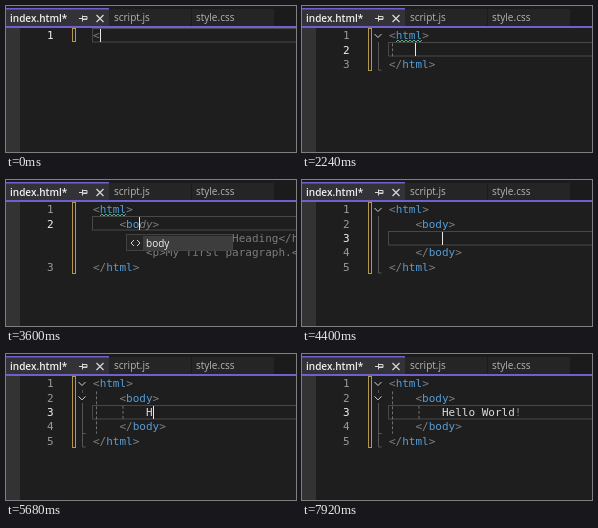
An HTML page for the animation above (8 s loop, 290 px wide and 146 px high).

```html
<!DOCTYPE html>
<html lang="en">
<head>
<meta charset="utf-8">
<title>Editor</title>
<style>
html, body { margin: 0; width: 100%; height: 100%; overflow: hidden; background: #1e1e1e; }
svg { display: block; width: 290px; height: 146px; }
text { white-space: pre; }
.ui { font: 10px "Open Sans", "Noto Sans", sans-serif; fill: #f0f0f0; }
.code { font: 11px "DejaVu Sans Mono", monospace; fill: #dcdcdc; }
.tag { fill: #569cd6; }
.mark { fill: #808080; }
.ghost { fill: #7c7c7c; }
.slant { font-style: italic; }
.num { fill: #9a9a9a; }
.now { fill: #f0f0f0; }
.line { fill: none; stroke: #8a8a8a; }
</style>
</head>
<body>
<svg viewBox="0 0 290 146">
  <rect width="290" height="146" fill="#1e1e1e"/>
  <rect y="22" width="14" height="124" fill="#333333"/>
  <rect width="290" height="21" fill="#1b1b1c"/>
  <rect x="103" y="3" width="82" height="17" fill="#252526"/>
  <rect x="186" y="3" width="82" height="17" fill="#252526"/>
  <rect y="2" width="103" height="19" fill="#333337"/>
  <rect y="2" width="103" height="1.5" fill="#6f60d0"/>
  <rect y="20" width="290" height="2" fill="#6f60d0"/>
  <text class="ui" x="4" y="16" font-weight="500" style="font-weight:600">index.html*</text>
  <text class="ui" x="108" y="15" style="fill:#b4b4b4">script.js</text>
  <text class="ui" x="190" y="15" style="fill:#b4b4b4">style.css</text>
  <path d="M73 12.5h3M76.5 9.5v6M77 10.5h4v3h-4M77 13h4" fill="none" stroke="#d8d8d8"/>
  <path d="M90.5 9l7 7m0-7l-7 7" fill="none" stroke="#d8d8d8" stroke-width="1.2"/>
  <g id="edit"></g>
</svg>
<script>
const LOOP = 8000, BLINK = 530, X0 = 87, CW = 6.62, TOP = 22, LH = 14.4;
const edit = document.getElementById('edit');
const colX = c => X0 + c * CW;
const rowY = r => TOP + r * LH;
const esc = s => s.replace(/&/g, '&amp;').replace(/</g, '&lt;');
const span = (cls, s) => s ? `<tspan class="${cls}">${esc(s)}</tspan>` : '';

// Colour brackets and tag names
const paint = s => s.split(/(<\/?\w*>?)/).map(p => {
  const m = /^(<\/?)(\w*)(>?)$/.exec(p);
  return m ? span('mark', m[1]) + span('tag', m[2]) + span('mark', m[3]) : esc(p);
}).join('');

// A row: [line number, indent, typed text, suggested text]
const steps = [];
const add = (t, rows, at, col, opts = {}) => steps.push({ t, rows, at, col, ...opts });

const typeRoot = (t, s, list) => add(t, [[1, 0, s, '']], 0, s.length, { list });
typeRoot(0, '<', false);
typeRoot(960, '<h', true);
typeRoot(1040, '<htm', true);
typeRoot(1120, '<html', true);
add(1280, [[1, 0, '<html></html>', '']], 0, 6);

const root = [1, 0, '<html>', ''];
const empty = [root, [2, 4, '', ''], [3, 0, '</html>', '']];
add(1760, empty, 1, 4, { wave: true });
add(2000, empty, 1, 4, { wave: true, fold: 1, guide: 1 });

const typeBody = (t, n) => {
  const s = '<body>';
  const hint = n > 1;
  const mid = hint
    ? [[0, 8, '', '<h1>My First Heading</h1>'], [0, 8, '', '<p>My first paragraph.</p>']] : [];
  add(t, [root, [2, 4, s.slice(0, n), hint ? s.slice(n) : ''], ...mid, [3, 0, '</html>', '']],
    1, 4 + n, { wave: true, tip: hint, slant: true });
};
[[3200, 1], [3360, 2], [3600, 3], [3760, 4], [3920, 5]].forEach(a => typeBody(...a));
add(4240, [root, [2, 4, '<body></body>', ''], [3, 0, '</html>', '']], 1, 10, { wave: true });

const typeHello = (t, n, hint, opts) => {
  const s = 'Hello World!';
  add(t, [root, [2, 4, '<body>', ''], [3, 8, s.slice(0, n), hint ? s.slice(n) : ''],
    [4, 4, '</body>', ''], [5, 0, '</html>', '']], 2, 8 + n, opts);
};
typeHello(4400, 0, false, { fold: 1 });
[[5200, 0], [5440, 1], [5760, 2], [6000, 2], [6240, 3], [6400, 4], [6640, 5], [6720, 6],
  [6880, 7], [6960, 8], [7040, 9], [7280, 10], [7360, 11]]
  .forEach(([t, n]) => typeHello(t, n, t >= 6000, { fold: 2, guide: 2 }));

const box = (x, y, w, h, fill, stroke = 'none') =>
  `<rect x="${x}" y="${y}" width="${w}" height="${h}" fill="${fill}" stroke="${stroke}"/>`;
const label = (x, y, s) => `<text class="ui" x="${x}" y="${y}">${s}</text>`;
const angles = (x, y) =>
  `<path d="M${x + 3} ${y - 3}l-3 3 3 3m3-6l3 3-3 3" fill="none" stroke="#d0d0d0"/>`;

function list() {
  const names = ['html', 'html4f', 'html4s', 'html4t', 'html5', 'xhtml10f', 'xhtml10s'];
  let s = box(92.5, 38.5, 145, 120, '#252526', '#424242') + box(109, 40, 116, 16, '#3d3d3d');
  names.forEach((name, i) => {
    const y = 48 + i * 16.6;
    s += label(113, y + 4, name);
    s += i ? `<rect x="98.5" y="${y - 4}" width="8" height="8" fill="none" stroke="#c4c4c4"/>` +
      `<path d="M101 ${y + 4}h3" stroke="#252526" stroke-width="1.5"/>` : angles(98, y);
  });
  return s + box(226, 39, 11, 107, '#2e2e2e') + box(228, 55, 7, 91, '#4d4d4d') +
    '<path d="M228 49.5l3.5-4.5 3.5 4.5z" fill="#999"/>';
}

const tip = () => box(120.5, 54.5, 106, 16, '#252526', '#424242') +
  box(137, 56, 89, 14, '#3d3d3d') + angles(125, 63) + label(140, 67, 'body');

function wave() {
  let d = 'M94 36';
  for (let i = 1; i <= 13; i++) d += `L${94 + i * 2} ${i % 2 ? 34 : 36}`;
  return `<path d="${d}" fill="none" stroke="#4ec98a" stroke-width=".9"/>`;
}

function folds(n, count) {
  const end = rowY(count) - 1;
  let s = `<path class="line" style="stroke:#555" d="M76.5 36V${end}h3"/>`;
  if (n > 1) s += box(72, 39, 9, 10, '#1e1e1e') + '<path class="line" style="stroke:#555" d="M77 79.5h3"/>';
  for (let i = 0; i < n; i++)
    s += `<path class="line" style="stroke:#d0d0d0" d="M72.5 ${rowY(i) + 6}l3.5 3.5 3.5-3.5"/>`;
  return s;
}

function guides(n, count) {
  let s = '';
  for (let i = 0; i < n; i++)
    s += `<path class="line" stroke-dasharray="3 2" style="stroke:#707070" d="M${90.5 + i * 26.5} ${
      rowY(i + 1) + 1}V${rowY(count - 1 - i)}"/>`;
  return s;
}

function draw(st, lit) {
  const n = st.rows.length, y = Math.round(rowY(st.at));
  let s = box(86.5, y + .5, 210, 13.5, 'none', '#484848');
  s += box(66.5, 22.5, 3, Math.round(n * LH) - 1, 'none', '#b5964a');
  if (st.fold) s += folds(st.fold, n);
  if (st.guide) s += guides(st.guide, n);
  st.rows.forEach(([num, indent, text, hint], i) => {
    const base = rowY(i) + 11.2;
    if (num) s += `<text class="code ${i === st.at ? 'now' : 'num'}" x="41" y="${base}">${num}</text>`;
    s += `<text class="code" x="${colX(indent)}" y="${base}">${paint(text)}${
      span(st.slant && num ? 'ghost slant' : 'ghost', hint)}</text>`;
  });
  if (st.wave) s += wave();
  if (st.list) s += list();
  if (st.tip) s += tip();
  if (lit) s += box(Math.round(colX(st.col)), y + 1, 1, 13, '#e8e8e8');
  edit.innerHTML = s;
}

let last = '';
function tick(now) {
  const t = now % LOOP;
  let i = steps.length - 1;
  while (steps[i].t > t) i--;
  const lit = (t - steps[i].t) % (2 * BLINK) < BLINK;
  const key = i + ':' + lit;
  if (key !== last) draw(steps[i], lit);
  last = key;
  requestAnimationFrame(tick);
}
const start = performance.now();
const run = () => { tick(Math.max(0, performance.now() - start)); };
draw(steps[0], true);
requestAnimationFrame(function loop(now) {
  const t = Math.max(0, now - start) % LOOP;
  let i = steps.length - 1;
  while (steps[i].t > t) i--;
  const lit = (t - steps[i].t) % (2 * BLINK) < BLINK;
  const key = i + ':' + lit;
  if (key !== last) draw(steps[i], lit);
  last = key;
  requestAnimationFrame(loop);
});
</script>
</body>
</html>
```
